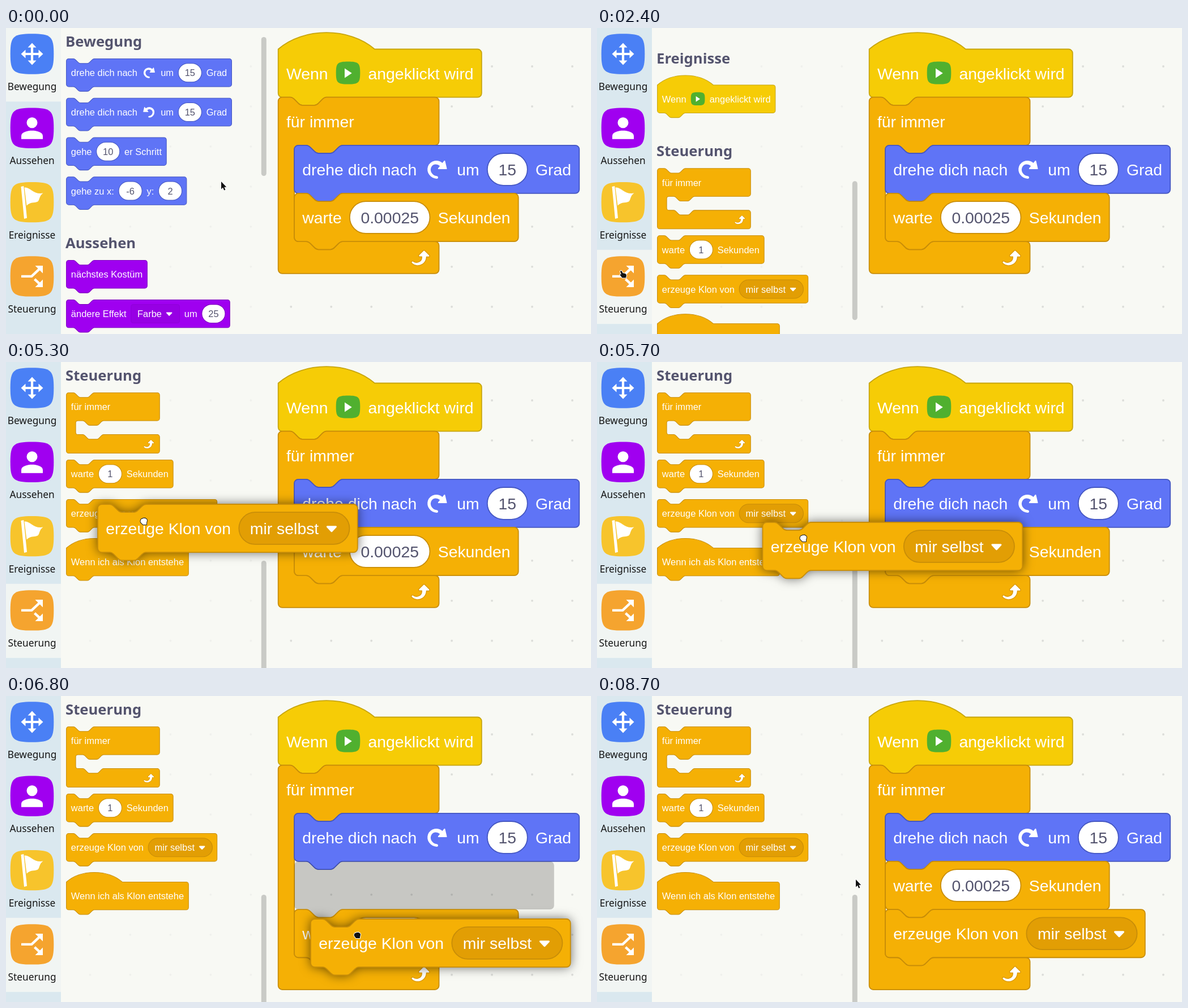
These frames come from a looping animation (1033 px wide and 542 px high, 9800 ms). An HTML page with a canvas:

```html
<!DOCTYPE html>
<html lang="de">
<head>
<meta charset="utf-8">
<title>Blöcke ziehen</title>
<style>
html, body { margin: 0; width: 100%; height: 100%; overflow: hidden; background: #f8f9f4; }
canvas { display: block; }
</style>
</head>
<body>
<canvas id="stage" width="1033" height="542"></canvas>
<script>
const ctx = document.getElementById('stage').getContext('2d');
const LOOP = 9800, STEP = 100;
const BIG = 1.774, SMALL = 1.029;      // pixels per block unit
const ROW = 48 * BIG, GRID = 40 * BIG, SCROLL_END = 808.4, INK = '#54546e';

const BLUE = { fill: '#5f74f6', edge: '#4557c2' };
const PURPLE = { fill: '#9f00f0', edge: '#7e00be', field: '#9700e4', square: true };
const YELLOW = { fill: '#f6cc06', edge: '#c7a50c' };
const ORANGE = { fill: '#f5b005', edge: '#c88d08', field: '#e29e04' };

// Block definitions: text parts are split by |, (x) is an input, [x] a menu, @x an icon.
const block = (color, text, kind) => ({ color, kind, parts: text.split('|') });
const turnRight = block(BLUE, 'drehe dich nach|@cw|um|(15)|Grad');
const turnLeft = block(BLUE, 'drehe dich nach|@ccw|um|(15)|Grad');
const step = block(BLUE, 'gehe|(10)|er Schritt');
const goTo = block(BLUE, 'gehe zu x:|(-6)|y:|(2)');
const costume = block(PURPLE, 'nächstes Kostüm');
const effect = block(PURPLE, 'ändere Effekt|[Farbe]|um|(25)');
const start = block(YELLOW, 'Wenn|@play|angeklickt wird', 'hat');
const forever = block(ORANGE, 'für immer', 'loop');
const waitOne = block(ORANGE, 'warte|(1)|Sekunden');
const waitShort = block(ORANGE, 'warte|(0.00025)|Sekunden');
const clone = block(ORANGE, 'erzeuge Klon von|[mir selbst]');
const cloneStart = block(ORANGE, 'Wenn ich als Klon entstehe', 'hat');

const palette = [
  [32.5, 'Bewegung'], [54.5, turnRight], [124.3, turnLeft], [194, step], [263.8, goTo],
  [389.5, 'Aussehen'], [411.5, costume], [481.4, effect],
  [676.9, 'Ereignisse'], [715.1, start],
  [840.9, 'Steuerung'], [862.9, forever], [981.9, waitOne], [1051.9, clone], [1137.8, cloneStart]
];

const TURN = new Path2D('M21.38 11.83h-7.61a.59.59 0 0 1-.43-1l1.75-2.19a5.9 5.9 0 0 0-4.7-1.58 5.07 5.07 0 0 0-4.11 3.17A6 6 0 0 0 7 15.77a6.51 6.51 0 0 0 5 2.92 1.31 1.31 0 0 1-.08 2.62 9.3 9.3 0 0 1-7.35-3.82 9.16 9.16 0 0 1-1.4-8.37A8.51 8.51 0 0 1 5.71 5.4a8.76 8.76 0 0 1 4.11-1.92 9.71 9.71 0 0 1 7.75 2.07l1.67-2.1a.59.59 0 0 1 1 .21L22 11.08a.59.59 0 0 1-.62.75z');
const REPEAT = new Path2D('M21.8 11h-2.6c0 1.5-.3 2.9-1 4.2-.8 1.6-2.1 2.8-3.7 3.6-1.5.8-3.3 1.1-4.9.8-1.6-.2-3.2-1-4.4-2.1-.4-.3-.4-.9-.1-1.2.3-.4.9-.4 1.2-.1 1 .7 2.2 1.1 3.4 1.1s2.3-.3 3.3-1c.9-.6 1.6-1.5 2-2.6.3-.9.4-1.8.2-2.8h-2.4c-.4 0-.7-.3-.7-.7 0-.2.1-.3.2-.4l4.4-4.4c.3-.3.7-.3.9 0L22 9.8c.3.3.4.6.3.9S22 11 21.8 11z');
const CURSORS = {
  arrow: ['M0 0V13.5L3 10.6 5.2 15.6 7.4 14.6 5.3 9.8H9.3z', '#111', '#fff'],
  point: ['M-5-5q1.5-2 3 0l1.5 3 4.5 1q2 1 2 3.5l-1 4h-6.5l-3.5-4.5q-1-2 1-2l1 1z', '#111', '#fff'],
  open: ['M-5-3q1-3 3-2 1-2 3-1 2-1 3 1 2 0 2 3l-1 4v3h-6l-4-4q-1-2 0-4z', '#fff', '#222'],
  fist: ['M-5-2q1-3 3-2 1-2 3-1 2-1 3 1 2 0 2 3l-1 4v2h-7l-3-4q-1-2 0-3z', '#111', '#fff']
};

// Keys: time, x, y and 1 where the segment leading there is linear.
const cursorKeys = [
  [0, 380, 272], [400, 380, 272], [500, 377, 276], [600, 377, 276], [1400, 80, 399],
  [1500, 80, 399], [1900, 46, 436], [3100, 46, 436], [3600, 187, 273], [3700, 187, 273],
  [3800, 189, 277], [4500, 189, 277], [4600, 187, 276], [5100, 187, 276], [5300, 243, 283, 1],
  [5700, 364, 313, 1], [6100, 579, 379, 1], [6300, 579, 379], [6800, 620, 424],
  [6900, 620, 424], [7100, 604, 462, 1], [8200, 604, 462], [8700, 457, 325]
];
const dragKeys = [
  [5300, 162, 252], [5700, 292.5, 284, 1], [6100, 497, 349, 1], [6300, 497, 349],
  [6800, 538, 395], [6900, 538, 395], [7100, 521, 431, 1]
];

function sample(keys, t) {
  const i = keys.findIndex(k => k[0] > t);
  if (i < 0) return keys.at(-1).slice(1, 3);
  if (i === 0) return keys[0].slice(1, 3);
  const [t0, x0, y0] = keys[i - 1], [t1, x1, y1, linear] = keys[i];
  let p = (t - t0) / (t1 - t0);
  if (!linear) p = p * p * (3 - 2 * p);
  return [x0 + (x1 - x0) * p, y0 + (y1 - y0) * p];
}

function at(x, y, scale, draw) {
  ctx.save();
  ctx.translate(x, y);
  ctx.scale(scale, scale);
  draw();
  ctx.restore();
}

function fill(path, color) {
  ctx.fillStyle = color;
  ctx.fill(path);
}

function stroke(path, color, width) {
  ctx.strokeStyle = color;
  ctx.lineWidth = width;
  ctx.lineJoin = 'round';
  ctx.stroke(path);
}

function text(str, x, y, font, color, align = 'left') {
  ctx.font = font;
  ctx.fillStyle = color;
  ctx.textAlign = align;
  ctx.fillText(str, x, y);
}

function roundRect(x, y, w, h, r) {
  const p = new Path2D();
  p.roundRect(x, y, w, h, r);
  return p;
}

function squircle(a, b) {
  const c = a * .87, d = b * .87;
  return new Path2D(`M${-a} 0C${-a} ${-d} ${-c} ${-b} 0 ${-b}S${a} ${-d} ${a} 0 ${c} ${b} 0 ${b} ${-a} ${d} ${-a} 0z`);
}

const notch = d => `c${2 * d} 0 ${3 * d} 1 ${4 * d} 2l${4 * d} 4c${d} 1 ${2 * d} 2 ${4 * d} 2h${12 * d}c${2 * d} 0 ${3 * d}-1 ${4 * d}-2l${4 * d}-4c${d}-1 ${2 * d}-2 ${4 * d}-2`;

function outline(w, kind, cavity) {
  const top = kind === 'hat' ? 'M0 0c25-22 71-22 96 0' : `M0 4a4 4 0 0 1 4-4H12${notch(1)}`;
  const bottom = kind === 'loop'
    ? `H64${notch(-1)}H20a4 4 0 0 0-4 4V${44 + cavity}a4 4 0 0 0 4 4H28${notch(1)}H${w - 4}a4 4 0 0 1 4 4v24a4 4 0 0 1-4 4H4`
    : `H48${notch(-1)}H4`;
  return new Path2D(`${top}H${w - 4}a4 4 0 0 1 4 4V44a4 4 0 0 1-4 4${bottom}a4 4 0 0 1-4-4z`);
}

const BLOCK_FONT = '16px "Liberation Sans", Arial, sans-serif', BASELINE = 29.9;

function layout(parts) {
  ctx.font = BLOCK_FONT;
  let x = 8;
  const items = parts.map(part => {
    const type = '([@'.includes(part[0]) ? part[0] : 'text';
    const label = type === 'text' ? part : part.replace(/[()[\]@]/g, '');
    const tw = ctx.measureText(label).width;
    const w = { '(': Math.max(40, tw + 22), '[': tw + 41.6, '@': 24, text: tw }[type];
    const item = { type, label, x, w };
    x += w + 8;
    return item;
  });
  return { items, width: x };
}

function drawIcon(name) {
  if (name === 'play') {
    at(12, 11.7, 1, () => fill(squircle(12, 11.3), '#50b02f'));
    fill(new Path2D('M8.6 7.2V16.8L15.8 12z'), '#fff');
  } else {
    if (name === 'ccw') ctx.transform(-1, 0, 0, 1, 24, 0);
    fill(TURN, '#fff');
  }
}

function drawItem({ type, label, x, w }, color) {
  if (type === '@') return at(x, 12, 1, () => drawIcon(label));
  if (type === 'text') return text(label, x, BASELINE, BLOCK_FONT, '#fff');
  const menu = type === '[';
  const box = roundRect(x, 8, w, 32, menu && color.square ? 4 : 16);
  fill(box, menu ? color.field : '#fff');
  stroke(box, color.edge, menu && color.square ? .4 : 1);
  if (menu) {
    text(label, x + 11, BASELINE, BLOCK_FONT, '#fff');
    const arrow = new Path2D(`M${x + w - 22} 22.4h8.4l-4.2 4.4z`);
    fill(arrow, '#fff');
    stroke(arrow, '#fff', 1.8);
  } else {
    text(label, x + w / 2, BASELINE, BLOCK_FONT, INK, 'center');
  }
}

function drawBlock({ color, kind, parts }, x, y, scale, { cavity = 24, shadow = false } = {}) {
  at(x, y, scale, () => {
    const { items, width } = layout(parts);
    const w = kind === 'loop' ? 160 : width;
    const shape = outline(w, kind, cavity);
    if (shadow) {
      ctx.shadowColor = 'rgba(0,0,0,.6)';
      ctx.shadowBlur = 19;
    }
    fill(shape, color.fill);
    ctx.shadowColor = 'transparent';
    stroke(shape, color.edge, 1);
    items.forEach(item => drawItem(item, color));
    if (kind === 'loop') at(w - 32, 52 + cavity, 1, () => {
      stroke(REPEAT, 'rgba(140,80,0,.25)', 1.6);
      fill(REPEAT, '#fff');
    });
  });
}

function drawDots() {
  for (let x = 148.5; x < 1033; x += GRID)
    for (let y = 68; y < 542; y += GRID) {
      ctx.fillStyle = x < 460 ? '#f0f1ed' : '#dcddd9';
      ctx.beginPath();
      ctx.arc(x, y, 1.9, 0, 7);
      ctx.fill();
    }
}

const categories = [
  ['Bewegung', '#4a80f5', () => {
    stroke(new Path2D('M-14 0H14M0-14V14'), '#fff', 4.2);
    for (let i = 0; i < 4; i++) {
      ctx.rotate(Math.PI / 2);
      fill(new Path2D('M19.5 0L11.5-7.5V7.5z'), '#fff');
    }
  }],
  ['Aussehen', '#a000f0', () => {
    fill(new Path2D('M-9.5-9.5a9.5 9.5 0 1 1 19 0a9.5 9.5 0 1 1-19 0M-19 19.5V14C-19 7-8 4.5 0 4.5S19 7 19 14V19.5z'), '#fff');
  }],
  ['Ereignisse', '#f7c42c', () => {
    fill(new Path2D('M-19.5-27.5L-14.8-28.5-9 28-14 29.5zM-13.5-26C-4-28 2-13 19.5-16 12-11 14-4 10-1 2 2-2-1-9.5 6z'), '#fff');
  }],
  ['Steuerung', '#f5a42f', () => {
    stroke(new Path2D('M-19 0H-.8L13-13M4.5 5L13 13'), '#fff', 4.4);
    fill(new Path2D('M5.5-19H19V-5.5zM19 5.5V19H5.5z'), '#fff');
  }]
];

function drawSidebar(selected) {
  ctx.fillStyle = '#dae8ef';
  ctx.fillRect(0, 0, 97, 542);
  ctx.fillStyle = '#f1f5f3';
  ctx.fillRect(0, selected * 131.3 - 1, 97, 131.3);
  categories.forEach(([label, color, icon], i) => {
    at(46, 46 + i * 131.3, 1, () => {
      fill(squircle(38.3, 35.7), color);
      icon();
    });
    text(label, 46, 110 + i * 131.3, '17.3px "Noto Sans", sans-serif', '#161616', 'center');
  });
}

function drawPalette(scroll) {
  for (const [y, item] of palette) {
    const top = y - scroll;
    if (top < -150 || top > 580) continue;
    if (typeof item === 'string') text(item, 105, top, 'bold 25.7px "Noto Sans", sans-serif', INK);
    else drawBlock(item, 106.6, top, SMALL);
  }
  fill(roundRect(450.8, 16 + scroll / SCROLL_END * 336, 9, 246, 4.5), '#c9cac6');
}

function drawScript(t) {
  const x = 480.7, inner = x + 16 * BIG, top = 37.5;
  const chain = [turnRight, waitShort];
  if (t >= 7600) chain.push(clone);
  else if (t >= 7000) chain.push('gap');
  else if (t >= 6000) chain.splice(1, 0, 'gap');
  drawBlock(start, x, top, BIG);
  drawBlock(forever, x, top + ROW, BIG, { cavity: chain.length * 48 });
  chain.forEach((item, i) => {
    const y = top + ROW * (i + 2);
    if (item === 'gap') {
      at(inner, y, BIG, () => fill(outline(layout(clone.parts).width), 'rgba(0,0,0,.2)'));
    } else drawBlock(item, inner, y, BIG);
  });
}

function cursorKind(t, x) {
  if (x < 97) return 'point';
  if (t < 3400 || t >= 8500) return 'arrow';
  return t >= 6000 && t < 7600 ? 'fist' : 'open';
}

function drawCursor(t) {
  const [x, y] = sample(cursorKeys, t);
  const [d, inside, edge] = CURSORS[cursorKind(t, x)];
  const shape = new Path2D(d);
  at(x, y, 1, () => {
    stroke(shape, edge, 2);
    fill(shape, inside);
  });
}

function render(t) {
  const switched = t >= 2400;
  const scroll = switched ? SCROLL_END - 194.3 * .7 ** ((t - 2400) * .06) : 0;
  ctx.fillStyle = '#f8f9f4';
  ctx.fillRect(0, 0, 1033, 542);
  drawDots();
  drawScript(t);
  drawPalette(scroll);
  drawSidebar(switched ? 3 : 0);
  if (t >= 5300 && t < 7600) drawBlock(clone, ...sample(dragKeys, t), BIG, { shadow: true });
  drawCursor(t);
}

function tick() {
  render(Math.floor(performance.now() % LOOP / STEP) * STEP);
  requestAnimationFrame(tick);
}
tick();
</script>
</body>
</html>
```
